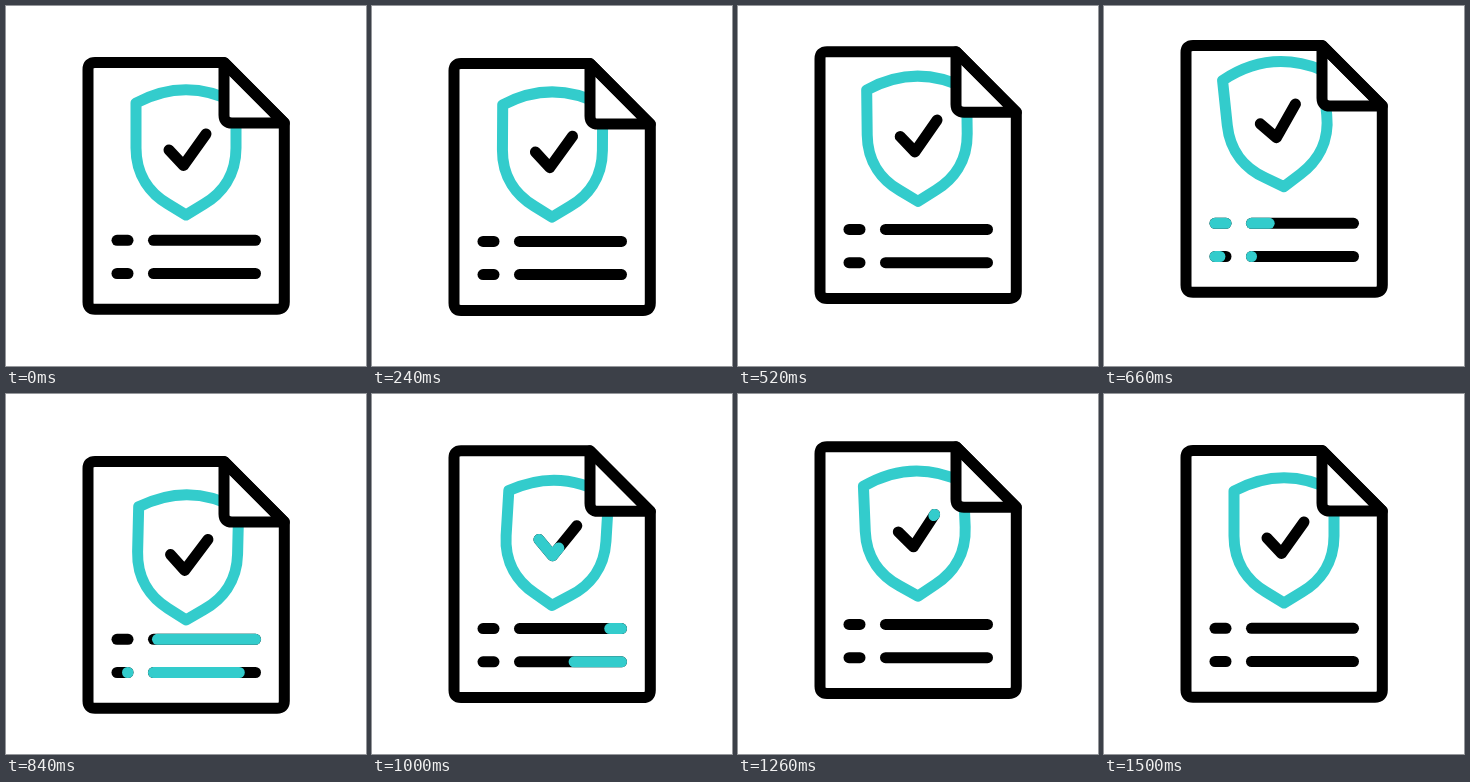
Write an HTML page with a canvas that moves like this. It is 360 px wide and 360 px high and loops after 1.56 s.

```html
<!DOCTYPE html>
<html lang="en">
<head>
<meta charset="utf-8">
<title>Protected document</title>
<style>
html, body { margin: 0; width: 100%; height: 100%; overflow: hidden; background: #fff; }
canvas { display: block; width: 360px; height: 360px; }
</style>
</head>
<body>
<canvas width="360" height="360"></canvas>
<script>
const ctx = document.querySelector('canvas').getContext('2d');
const LOOP = 1560, BLACK = '#000', TEAL = '#33cccc';

// Keyframes: [time in ms, value]
const pageY = [[200, 0], [400, 11], [600, -22], [840, 11], [1112, -5.7], [1500, 0]];
const shieldY = [[200, 0], [400, 10.5], [620, -12.5], [880, 7], [1140, -4], [1500, 0]];
const shieldTurn = [[200, 0], [400, 3.6], [660, -6], [940, 4.2], [1220, -2.5], [1500, 0]];

const page = new Path2D('M218 56.5H89Q82 56.5 82 63.5V296Q82 303.3 89 303.3H271Q278.3 303.3 278.3 296V117L218 56.5');
const fold = new Path2D('M218 56.5V109Q218 117 226 117H278.3Z');
const shield = new Path2D('M130 97Q180 70.5 230 97V142C230 170 215 188 198 198L180 209L162 198C145 188 130 170 130 142Z');

// Strokes swept by a teal highlight: head and tail start times, sweep duration
const rows = [
  { points: [[111, 234.3], [122, 234.3]], head: 540, tail: 675, span: 120 },
  { points: [[147.5, 234.3], [249.5, 234.3]], head: 594, tail: 810, span: 245 },
  { points: [[111, 267.5], [122, 267.5]], head: 605, tail: 737, span: 120 },
  { points: [[147.5, 267.5], [249.5, 267.5]], head: 660, tail: 873, span: 245 }
];
const check = { points: [[163, 144], [177.5, 159.5], [200, 128]], head: 875, tail: 1040, span: 245 };

const ease = p => (1 - Math.cos(Math.PI * Math.min(1, Math.max(0, p)))) / 2;

function valueAt(keys, t) {
  if (t <= keys[0][0]) return keys[0][1];
  for (let i = 1; i < keys.length; i++) {
    const [t0, a] = keys[i - 1], [t1, b] = keys[i];
    if (t < t1) return a + (b - a) * ease((t - t0) / (t1 - t0));
  }
  return keys[keys.length - 1][1];
}

function strokePath(path, color, fill) {
  if (fill) {
    ctx.fillStyle = fill;
    ctx.fill(path);
  }
  ctx.strokeStyle = color;
  ctx.stroke(path);
}

// Strokes the part of a polyline between two fractions of its length
function strokePart(points, from, to, color) {
  const steps = points.slice(1).map((p, i) => Math.hypot(p[0] - points[i][0], p[1] - points[i][1]));
  const total = steps.reduce((a, b) => a + b);
  let pos = 0;
  ctx.beginPath();
  steps.forEach((len, i) => {
    const a = Math.max(0, (from * total - pos) / len);
    const b = Math.min(1, (to * total - pos) / len);
    pos += len;
    if (a >= b) return;
    const [[x0, y0], [x1, y1]] = [points[i], points[i + 1]];
    if (a > 0 || i === 0) ctx.moveTo(x0 + (x1 - x0) * a, y0 + (y1 - y0) * a);
    ctx.lineTo(x0 + (x1 - x0) * b, y0 + (y1 - y0) * b);
  });
  ctx.strokeStyle = color;
  ctx.stroke();
}

function drawSwept({ points, head, tail, span }, t) {
  strokePart(points, 0, 1, BLACK);
  if (t > head && t < tail + span) {
    strokePart(points, ease((t - tail) / span), ease((t - head) / span), TEAL);
  }
}

function draw(t) {
  ctx.setTransform(1, 0, 0, 1, 0, 0);
  ctx.fillStyle = '#fff';
  ctx.fillRect(0, 0, 360, 360);
  ctx.lineWidth = 11;
  ctx.lineCap = ctx.lineJoin = 'round';
  ctx.translate(0, valueAt(pageY, t));

  rows.forEach(row => drawSwept(row, t));

  ctx.save();
  ctx.translate(180, 209 + valueAt(shieldY, t));
  ctx.rotate(valueAt(shieldTurn, t) * Math.PI / 180);
  ctx.translate(-180, -209);
  strokePath(shield, TEAL);
  drawSwept(check, t);
  ctx.restore();

  strokePath(fold, BLACK, '#fff');
  strokePath(page, BLACK);
}

const start = performance.now();
function tick() {
  draw((performance.now() - start) % LOOP);
  requestAnimationFrame(tick);
}
tick();
</script>
</body>
</html>
```
